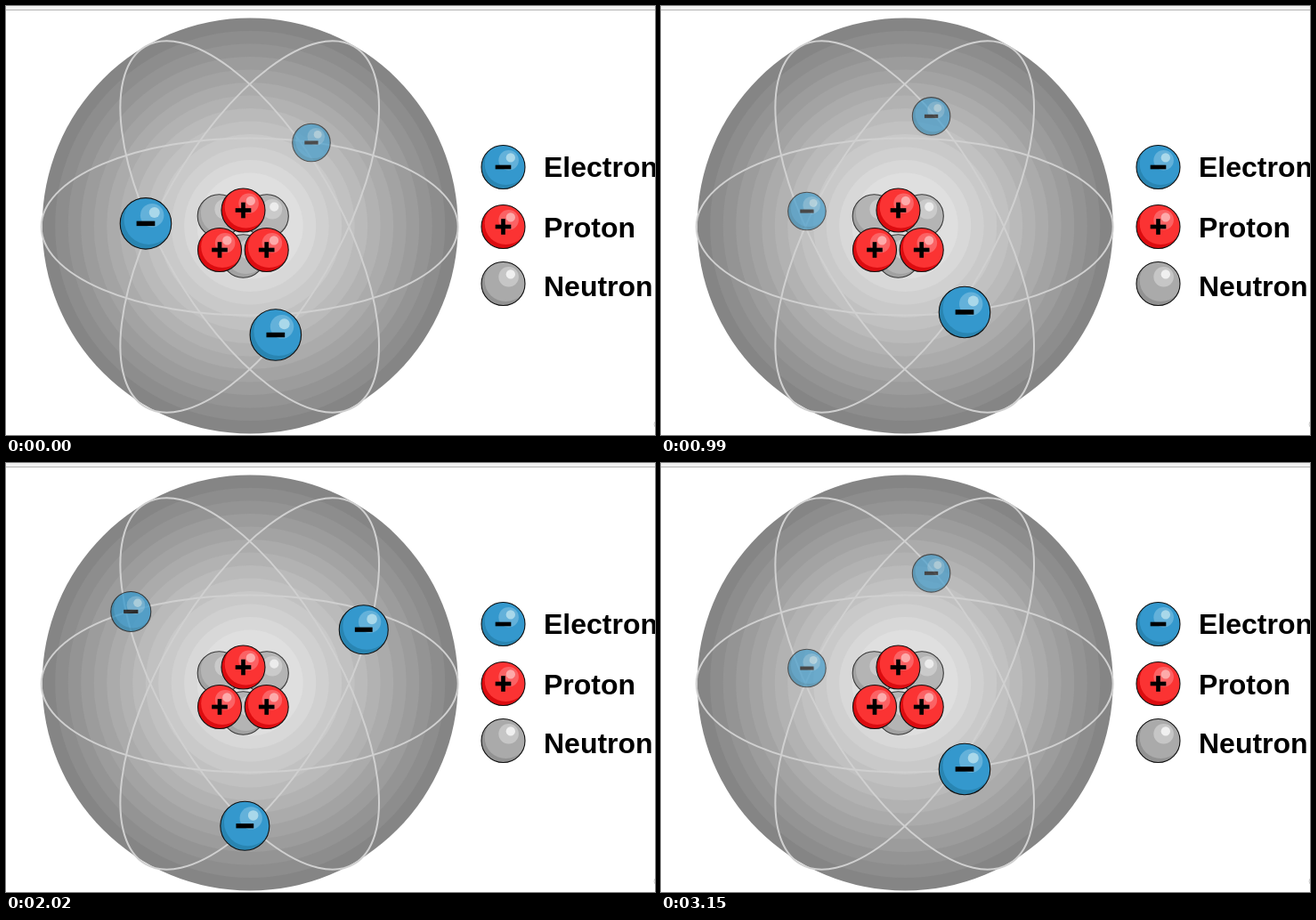
These frames come from a looping animation (729x482 px, 3170 ms). An HTML page with a canvas:

```html
<!DOCTYPE html>
<html>
<head>
<meta charset="utf-8">
<style>
html, body { margin: 0; width: 729px; height: 482px; overflow: hidden; background: #fff; }
canvas { display: block; }
</style>
</head>
<body>
<canvas id="stage" width="729" height="482"></canvas>
<script>
const ctx = document.getElementById('stage').getContext('2d');
const { PI, sin, cos, floor, hypot } = Math;
const LOOP = 3170, STEP = 45;    // ms
const POSES = 16, FIRST = 13;    // poses per turn, pose at the loop start
const A = 234, B = 99.5;         // half axes of every orbit
const DEG = PI / 180;

const BLUE = { main: '#3498cd', dark: '#2985b2', glow: '#63b1da', spot: '#a9d8ea' };
const RED = { main: '#fb3333', dark: '#dc0c10', glow: '#fb6264', spot: '#fdaaaa' };
const GREY = { main: '#aaaaaa', dark: '#929292', glow: '#c6c6c6', spot: '#f0f0f0' };

// Distance covered along the ellipse, one entry per degree
const arc = [0];
for (let d = 0; d < 360; d++) {
  const mid = (d + 0.5) * DEG;
  arc.push(arc[d] + hypot(A * sin(mid), B * cos(mid)) * DEG);
}
const ROUND = arc[360];

function angleAt(dist) {
  const s = ((dist % ROUND) + ROUND) % ROUND;
  let d = 0;
  while (arc[d + 1] < s) d++;
  return (d + (s - arc[d]) / (arc[d + 1] - arc[d])) * DEG;
}

// Constant speed along the orbit, plus a slight drift; near: +1 or -1 sets the depth order.
const electrons = [
  { x: 274, y: 248.6, tilt: 0, start: 1, near: 1, drift: () => 0 },
  { x: 268.7, y: 245.2, tilt: -60, start: ROUND / 2 + 13.7, near: -1,
    drift: q => 7 * (1 - cos(2 * q)) + 3 * sin(q) },
  { x: 271, y: 250, tilt: -120, start: -11.4, near: -1,
    drift: q => 10 * sin(2 * q) - 18 * sin(q) - 7 * (1 - cos(q)) }
];

function disc(g, x, y, r, fill) {
  g.beginPath();
  g.arc(x, y, r, 0, 2 * PI);
  g.fillStyle = fill;
  g.fill();
}

function paintBall(g, x, y, r, tone, sign) {
  g.save();
  disc(g, x, y, r, tone.dark);
  g.clip();
  disc(g, x + r * 0.12, y - r * 0.15, r * 0.97, tone.main);
  disc(g, x + r * 0.25, y - r * 0.32, r * 0.46, tone.glow);
  disc(g, x + r * 0.34, y - r * 0.43, r * 0.21, tone.spot);
  g.restore();
  g.beginPath();
  g.arc(x, y, r, 0, 2 * PI);
  g.lineWidth = 1.1;
  g.strokeStyle = '#111';
  g.stroke();
  g.fillStyle = '#000';
  const w = r * 0.72, h = r * 0.19;
  if (sign) g.fillRect(x - w / 2, y - h / 2, w, h);
  if (sign === '+') g.fillRect(x - h / 2, y - w / 2, h, w);
}

const scratch = document.createElement('canvas');
scratch.width = scratch.height = 80;
const sg = scratch.getContext('2d');

// Painted opaque first, so the fade treats the ball as one piece.
function ball(g, x, y, r, tone, sign, alpha = 1) {
  if (alpha >= 1) return paintBall(g, x, y, r, tone, sign);
  const px = floor(x), py = floor(y);
  sg.clearRect(0, 0, 80, 80);
  paintBall(sg, 40 + x - px, 40 + y - py, r, tone, sign);
  g.globalAlpha = alpha;
  g.drawImage(scratch, px - 40, py - 40);
  g.globalAlpha = 1;
}

function legend(g, y, base, tone, sign, label) {
  ball(g, 558.5, y, 24.5, tone, sign);
  g.fillStyle = '#000';
  g.font = 'bold 32px "Liberation Sans", Arial, sans-serif';
  g.fillText(label, 604, base);
}

function drawScene(g) {
  g.fillStyle = '#fff';
  g.fillRect(0, 0, 729, 482);
  g.fillStyle = '#f1f1f1';
  g.fillRect(0, 0, 729, 4);
  g.fillStyle = '#b4b4b4';
  g.fillRect(0, 4, 729, 1);

  for (let i = 0; i < 13; i++) {
    const c = Math.round(133 + 7.5 * i);
    disc(g, 274.2, 247, 233.5 - 14.5 * i, `rgb(${c},${c},${c})`);
  }

  g.strokeStyle = '#d0d0d0';
  g.lineWidth = 2;
  for (const e of electrons) {
    g.beginPath();
    g.ellipse(273.7, 248, A, B, e.tilt * DEG, 0, 2 * PI);
    g.stroke();
  }

  // Two interleaved triangles: neutrons behind, protons in front
  for (const [x, y] of [[239.5, 236], [293, 236], [266.5, 281]]) ball(g, x, y, 24.3, GREY, '', 0.8);
  for (const [x, y] of [[266.5, 229.5], [240, 274], [292.7, 274]]) ball(g, x, y, 24.5, RED, '+');

  legend(g, 181, 192, BLUE, '-', 'Electron');
  legend(g, 248, 260, RED, '+', 'Proton');
  legend(g, 312, 326, GREY, '', 'Neutron');

  g.beginPath();
  g.arc(732, 470, 4, 0, 2 * PI);
  g.strokeStyle = '#ccc';
  g.lineWidth = 1;
  g.stroke();
}

const scene = document.createElement('canvas');
scene.width = 729;
scene.height = 482;
drawScene(scene.getContext('2d'));

// Triangle wave over one turn: 0, 1, 0, -1
const wave = p => 1 - Math.abs(((p + 0.25) % 1) * 4 - 2);

function draw(t) {
  ctx.drawImage(scene, 0, 0);
  const turn = ((FIRST + floor(t / STEP + 0.25)) % POSES) / POSES;
  for (const e of electrons) {
    const a = angleAt(e.start + turn * ROUND + e.drift(turn * 2 * PI));
    const u = A * cos(a), v = B * sin(a);
    const c = cos(e.tilt * DEG), s = sin(e.tilt * DEG);
    const near = e.near * wave(turn);
    ball(ctx, e.x + u * c - v * s, e.y + u * s + v * c, 25 + 5 * near, BLUE, '-',
      1 + Math.min(0, near) * 0.5);
  }
}

const origin = performance.now();
function tick() {
  draw((performance.now() - origin) % LOOP);
  requestAnimationFrame(tick);
}
tick();
</script>
</body>
</html>
```
